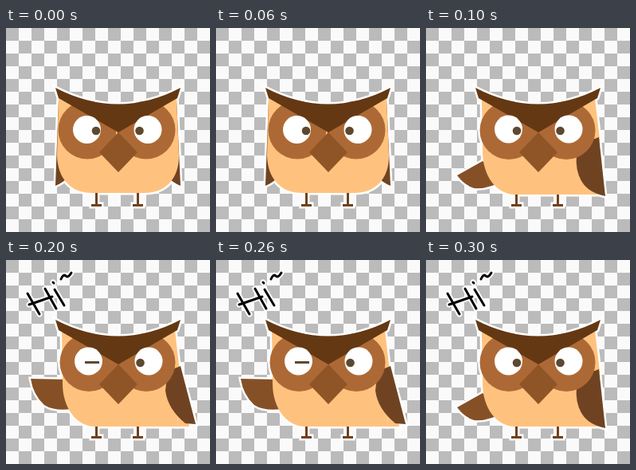
An HTML page for the animation above (400 ms loop, 256 by 256 pixels).

```html
<!DOCTYPE html>
<html lang="en">
<head>
<meta charset="utf-8">
<title>Waving owl</title>
<style>
html, body { margin: 0; width: 100%; height: 100%; overflow: hidden; }
body { background: repeating-conic-gradient(#fafafa 0 25%, #bbb 0 50%) 0 0 / 32px 32px; }
svg { display: block; width: 100vw; height: 100vh; }

.body { fill: #ffc27e; }
.brow { fill: #643813; }
.wing { fill: #6f4322; }
.arm { fill: #865027; }
.beak { fill: #8f5526; }
.disc { fill: #ad6935; }
.eye { fill: #fff; }
.pupil { fill: #5d4930; }
.leg { fill: #70411d; }

.show { visibility: hidden; animation: 400ms step-end infinite; }
.rest { animation-name: rest; }
.half { animation-name: half; }
.full { animation-name: full; }
.hi { animation-name: hi; }
@keyframes rest { 0% { visibility: visible; } 25%, 100% { visibility: hidden; } }
@keyframes half { 0%, 50% { visibility: hidden; } 25%, 75% { visibility: visible; } }
@keyframes full { 0%, 75%, 100% { visibility: hidden; } 50% { visibility: visible; } }
@keyframes hi { 0% { visibility: hidden; } 50%, 100% { visibility: visible; } }
</style>
</head>
<body>
<svg viewBox="0 0 256 256">
  <defs>
    <path id="brow" class="brow" d="M62 75Q141 116 219 75L215 88L141 131L66 88Z"/>
    <path id="beak" class="beak" d="M141 131L165 156L141 181L117 156Z"/>
    <path id="legs" class="leg" d="M112 206h3v15h5v3h-13v-3h5ZM164 206h3v15h5v3h-13v-3h5Z"/>
    <path id="torso" class="body" d="M70 88L71 155C71 185 88 209 112 209H215L218 140L212 88L141 120Z"/>
    <g id="face">
      <circle class="disc" cx="104" cy="128.500" r="36.500"/>
      <circle class="disc" cx="176" cy="128.500" r="36.500"/>
      <use href="#beak"/>
      <use href="#brow"/>
      <circle class="eye" cx="103.500" cy="127" r="17.500"/>
      <circle class="eye" cx="179" cy="127" r="17.500"/>
      <circle class="pupil" cx="168.500" cy="129" r="5.300"/>
    </g>

    <g id="rest">
      <use href="#legs"/>
      <path class="wing" d="M66 90L62 198Q72 194 79 186ZM214 90L219 198Q209 194 202 186Z"/>
      <path class="body" d="M66 88L64 160C65 190 82 207 108 207H173C200 207 217 190 217 160L214 88L141 120Z"/>
      <circle class="disc" cx="102" cy="128" r="36.500"/>
      <circle class="disc" cx="176" cy="128" r="36.500"/>
      <use href="#beak"/>
      <use href="#brow"/>
      <circle class="eye" cx="101.500" cy="127.500" r="17.500"/>
      <circle class="eye" cx="178" cy="127.500" r="17.500"/>
      <circle class="pupil" cx="113" cy="129" r="5.300"/>
      <circle class="pupil" cx="167.500" cy="129" r="5.300"/>
    </g>

    <g id="half">
      <use href="#legs"/>
      <path class="arm" d="M39 185L71 167L100 190Q78 203 60 201Q48 197 39 185Z"/>
      <use href="#torso"/>
      <path class="wing" d="M217 137L225 211Q204 207 195 192Q187 178 189 158L204 142Z"/>
      <use href="#face"/>
      <circle class="pupil" cx="114" cy="129" r="5.300"/>
    </g>

    <g id="full">
      <use href="#legs"/>
      <path class="arm" d="M31 149L80 150L90 186Q62 191 48 182Q34 169 31 149Z"/>
      <path class="body" d="M215 209H230L218 140Z"/>
      <use href="#torso"/>
      <path class="wing" d="M219 133L238 206L225 205Q203 187 200 164Q201 148 207 138Z"/>
      <use href="#face"/>
      <rect class="pupil" x="99" y="127" width="18" height="3"/>
    </g>

    <path id="hi" fill="none" stroke-linecap="round" stroke-linejoin="round"
      d="M27 42L42 68M29 56L58 46M49 36L63 61M61 37L73 57M59 28L60 29M69 24Q72 17 75 20T82 16"/>
  </defs>

  <g class="show rest"><use href="#rest" stroke="#fff" stroke-width="5"/><use href="#rest"/></g>
  <g class="show half"><use href="#half" stroke="#fff" stroke-width="5"/><use href="#half"/></g>
  <g class="show full"><use href="#full" stroke="#fff" stroke-width="5"/><use href="#full"/></g>
  <g class="show hi" role="img" aria-label="Hi~">
    <use href="#hi" stroke="#fff" stroke-width="7"/>
    <use href="#hi" stroke="#000" stroke-width="3"/>
  </g>
</svg>
</body>
</html>
```
